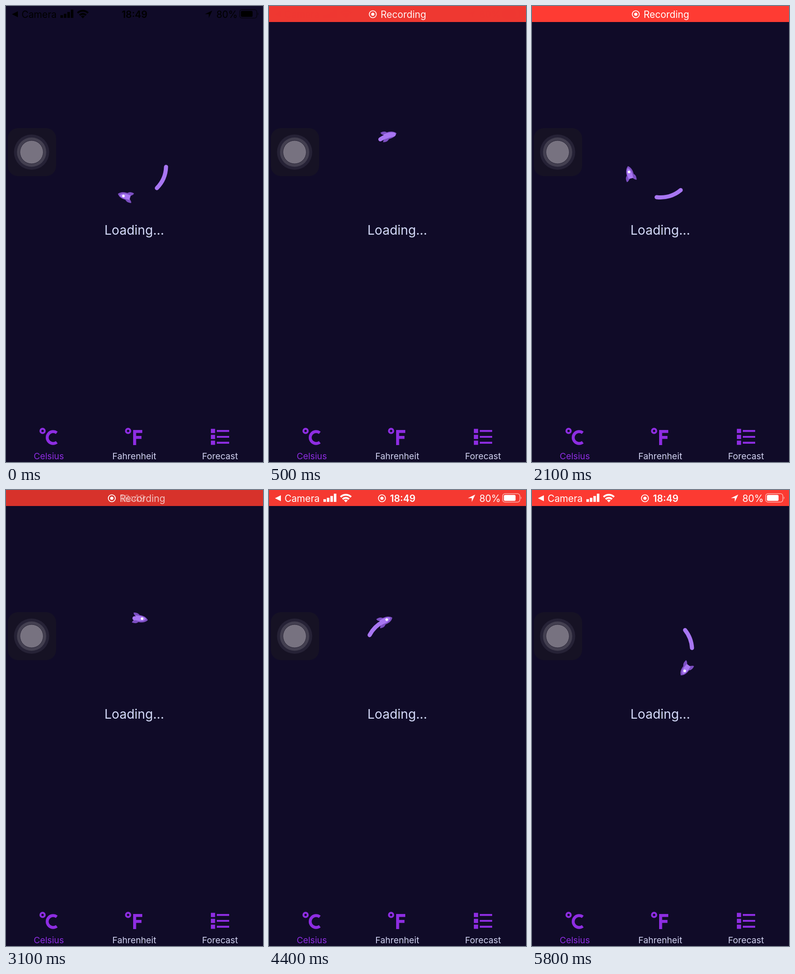
An HTML page for the animation above (5900 ms loop, 562 by 997 pixels).

```html
<!DOCTYPE html>
<html lang="en">
<head>
<meta charset="utf-8">
<title>Loading</title>
<style>
  html, body { margin: 0; width: 100%; height: 100%; overflow: hidden; background: #100b28; }
  svg { display: block; width: 100%; height: 100%; }
  text { font-family: Inter, "Open Sans", sans-serif; }
  .bar { font-size: 20.8px; }
  .bold { font-weight: 600; }
  .tab { font-size: 19.2px; text-anchor: middle; fill: #d2d3f2; }
</style>
</head>
<body>
<svg viewBox="0 0 562 997">
  <defs>
    <g id="side" class="bar" fill="currentColor">
      <path d="M13 18L26 11.5V24.5Z"/>
      <text x="34" y="25.6">Camera</text>
      <path d="M119 20h5.5v6h-5.5zM126.6 17h5.5v9h-5.5zM134.2 13h5.5v13h-5.5zM141.8 8h5.5v18h-5.5z"/>
      <g fill="none" stroke="currentColor" stroke-width="4">
        <path d="M156.5 15.2A16.5 16.5 0 0 1 179.5 15.2"/>
        <path d="M161 20A10 10 0 0 1 175 20"/>
      </g>
      <path d="M168 27L163.8 22.6A6 6 0 0 1 172.2 22.6Z"/>
      <path d="M451 10L443.5 26V17.8H435Z"/>
      <text x="460" y="25.6">80%</text>
      <rect x="511" y="8" width="37.5" height="18.5" rx="5" fill="none" stroke="currentColor" stroke-width="1.6" opacity=".6"/>
      <rect x="513.7" y="10.7" width="25.5" height="13" rx="2.8"/>
      <path d="M550.5 14q3 3.2 0 6.5z" opacity=".6"/>
    </g>
    <circle id="degree" cy="929" r="4.7" fill="none" stroke="#8e2de2" stroke-width="4.2"/>
  </defs>

  <g id="dark" color="#000">
    <use href="#side"/>
    <text class="bar bold" x="281" y="25.6" text-anchor="middle">18:49</text>
  </g>
  <rect id="banner" width="562" height="35"/>
  <use id="light" href="#side" color="#fff"/>
  <g id="pill" fill="#fff">
    <circle cx="227" cy="18" r="7.7" fill="none" stroke="#fff" stroke-width="1.8"/>
    <circle cx="227" cy="18" r="3.6"/>
    <text id="rec" class="bar" x="244" y="25.6">Recording</text>
    <text id="clock" class="bar bold" x="244.5" y="25.6">18:49</text>
  </g>

  <rect x="4" y="267" width="105.5" height="105" rx="22" fill="#161224"/>
  <g stroke="#2a2638" stroke-width="1">
    <circle cx="56" cy="319.5" r="38.5" fill="#262236" stroke="none"/>
    <circle cx="56" cy="319.5" r="32" fill="#433f50" stroke="none"/>
    <circle cx="56" cy="319.5" r="25.5" fill="#777280"/>
  </g>

  <g id="rocket">
    <g fill="#7c4fc2">
      <path d="M-5 0C-11 4-12.5 8-11 16Q-8 16-4.5 11.5H4.5Q8 16 11 16C12.5 8 11 4 5 0Z"/>
      <path d="M0-17.5C7-12 9-4 7 9.5H-7C-9-4-7-12 0-17.5Z"/>
    </g>
    <path d="M-1.5-13C4-9 6-3 4.5 10.5H-5.5C-7-2-6-9-1.5-13Z" fill="#a876f2"/>
    <path d="M-4 10.5H4L3 14H-3Z" fill="#100b28"/>
    <circle cx="-1" cy="-4.5" r="2.8" fill="#fff"/>
  </g>
  <path id="trail" fill="none" stroke="#a876f2" stroke-width="9" stroke-linecap="round"/>
  <text x="280.5" y="500" font-size="28" text-anchor="middle" fill="#d4daf9">Loading...</text>

  <g fill="#8e2de2">
    <use href="#degree" x="80"/>
    <path d="M111 933.2A13 13 0 1 0 111 953.8" fill="none" stroke="#8e2de2" stroke-width="6.4"/>
    <use href="#degree" x="267"/>
    <path d="M278 927H298V933.4H284.6V940H296.3V946.4H284.6V960H278Z"/>
    <path d="M448 924.5h9.3v9.3h-9.3zM448 937.4h9.3v9.3h-9.3zM448 950.3h9.3v9.3h-9.3zM461 927h27v4.2h-27zM461 939.9h27v4.2h-27zM461 952.8h27v4.2h-27z"/>
  </g>
  <text class="tab" x="93.5" y="991" style="fill:#8e2de2">Celsius</text>
  <text class="tab" x="280.5" y="991">Fahrenheit</text>
  <text class="tab" x="468" y="991">Forecast</text>
</svg>
<script>
const LOOP = 5900, LAP = 1990, LAP_START = 960;
const CX = 281, CY = 349.5, R = 69;
const $ = id => document.getElementById(id);
const clamp = v => Math.max(0, Math.min(1, v));
const ramp = (t, from, length) => clamp((t - from) / length);
const smooth = u => u * u * (3 - 2 * u);

// Degrees clockwise from the top during one lap, at the times in `keys`.
const keys = [0, 150, 340, 860, 1030, 1140, 1450, 1530, LAP];
const nose = [10, 10, 25, 127, 196, 255, 336.5, 344, 370];
const head = [0, 0, 13, 86.5, 134.5, 186.6, 333, 353, 360];
const tail = [0, 0, 1.5, 51, 91.5, 139.7, 297.5, 327, 360];

// Monotone cubic curve through the keys.
function curve(ys, x) {
  const slope = i => (ys[i + 1] - ys[i]) / (keys[i + 1] - keys[i]);
  const tangent = i => {
    if (i === 0 || i === keys.length - 1) return 0;
    const a = slope(i - 1), b = slope(i);
    return a * b > 0 ? 2 * a * b / (a + b) : 0;
  };
  let i = 0;
  while (i < keys.length - 2 && x >= keys[i + 1]) i++;
  const w = keys[i + 1] - keys[i], u = (x - keys[i]) / w, v = 1 - u;
  return ys[i] * v * v * (1 + 2 * u) + ys[i + 1] * smooth(u)
    + w * u * v * (tangent(i) * v - tangent(i + 1) * u);
}

function point(deg) {
  const a = deg * Math.PI / 180;
  return `${(CX + R * Math.sin(a)).toFixed(2)} ${(CY - R * Math.cos(a)).toFixed(2)}`;
}

function drawSpinner(t) {
  const lap = (t - LAP_START + LAP) % LAP;
  const angle = curve(nose, lap), from = curve(tail, lap);
  const to = Math.max(from + 0.1, curve(head, lap));
  $('rocket').setAttribute('transform', `translate(${point(angle)}) rotate(${angle + 90})`);
  $('trail').setAttribute('d', `M${point(from)}A${R} ${R} 0 0 1 ${point(to)}`);
}

function drawHeader(t) {
  const shown = ramp(t, 100, 420);
  const swap = ramp(t, 3010, 300);
  const glow = (235 + 20 * Math.cos(2 * Math.PI * (t - 2180) / 1900)) / 255;
  $('banner').setAttribute('fill', `rgb(${255 * glow},${59 * glow},${51 * glow})`);
  $('banner').setAttribute('opacity', shown);
  $('dark').setAttribute('opacity', 1 - shown);
  $('light').setAttribute('opacity', ramp(t, 3130, 300));
  $('pill').setAttribute('opacity', shown);
  $('pill').setAttribute('transform', `translate(${20 * smooth(swap)})`);
  $('rec').setAttribute('opacity', 1 - swap);
  $('clock').setAttribute('opacity', swap);
}

const start = performance.now();
function frame() {
  const t = (performance.now() - start) % LOOP;
  drawSpinner(t);
  drawHeader(t);
  requestAnimationFrame(frame);
}
frame();
</script>
</body>
</html>
```
